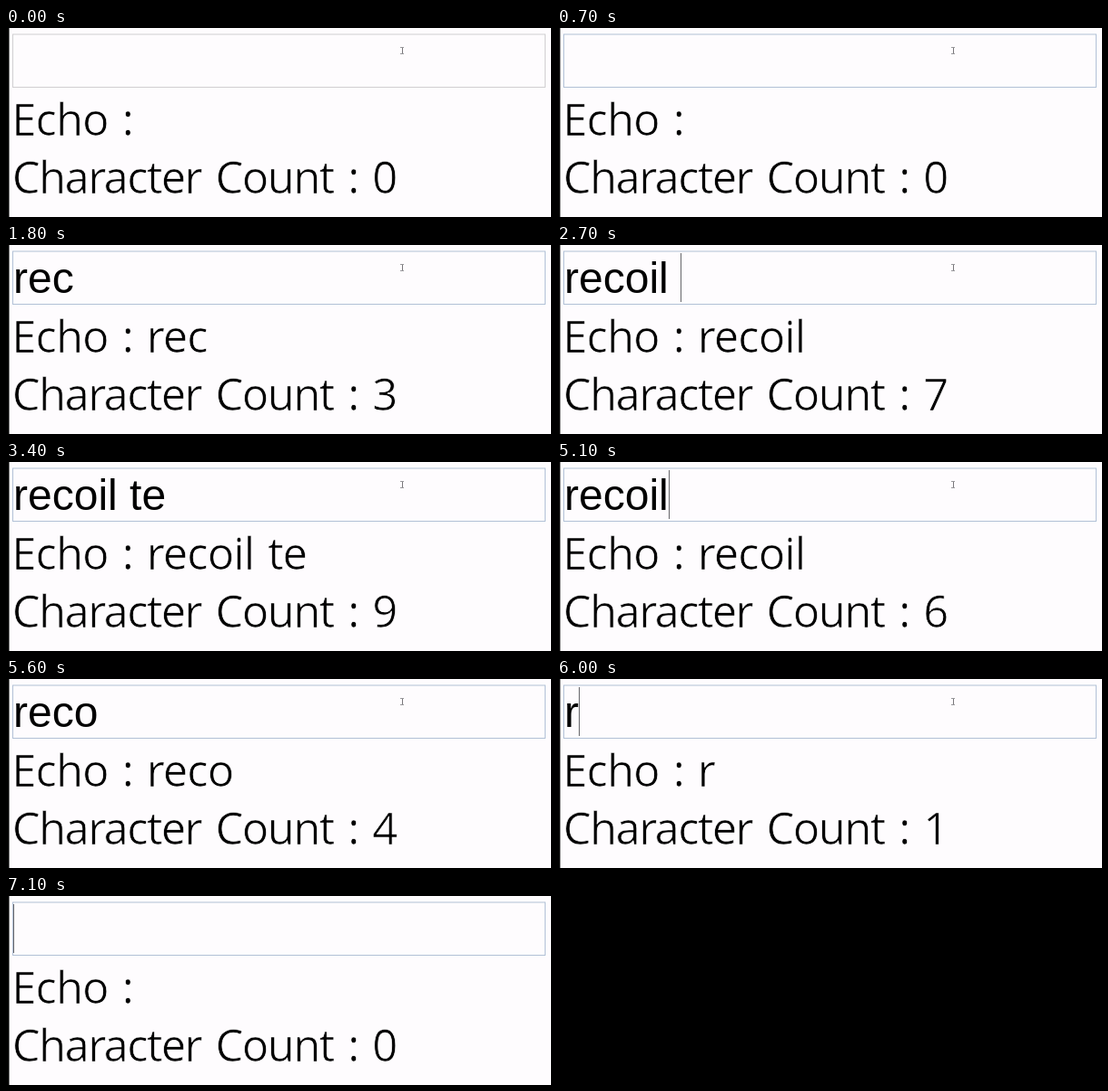
These frames come from a looping animation (600x209 px, 7.2 s). An HTML page with a canvas:

```html
<!DOCTYPE html>
<html lang="en">
<head>
<meta charset="utf-8">
<title>Character counter</title>
<style>
  html, body { margin: 0; width: 100%; height: 100%; overflow: hidden; background: #fefcfe; }
  canvas { display: block; }
</style>
</head>
<body>
<canvas id="stage" width="600" height="209"></canvas>
<script>
const LOOP = 7200;
const PAPER = "#fefcfe";
const PHRASE = "recoil tes";
const LABEL_FONT = '49px "Open Sans", "Noto Sans", sans-serif';
const INPUT_FONT = '48px "Liberation Sans", Arial, sans-serif';

const FOCUS = 100, POINTER_GONE = 6500;
const TYPING = { start: 1190, pace: 250 };
const DELETING = { start: 4495, pace: 185 };
const BLINK = { period: 1150, on: 550 };

const ctx = document.getElementById("stage").getContext("2d");

// Number of evenly paced key presses made by time t
function presses({ start, pace }, t) {
  const count = Math.floor((t - start) / pace) + 1;
  return Math.max(0, Math.min(PHRASE.length, count));
}

function rect(color, x, y, w, h) {
  ctx.fillStyle = color;
  ctx.fillRect(x, y, w, h);
}

function label(str, x, y, letterGap, wordGap) {
  ctx.font = LABEL_FONT;
  ctx.letterSpacing = letterGap + "px";
  ctx.wordSpacing = wordGap + "px";
  ctx.fillStyle = "#000";
  ctx.fillText(str, x, y);
  // A thin outline in the paper colour lightens the strokes
  ctx.lineWidth = 0.7;
  ctx.strokeStyle = PAPER;
  ctx.strokeText(str, x, y);
}

function drawInput(value, t) {
  const focused = t >= FOCUS;
  ctx.lineWidth = 1;
  ctx.strokeStyle = focused ? "#b1c1d6" : "#d0cfd1";
  ctx.strokeRect(7.5, 7, 586, 58.5);

  ctx.font = INPUT_FONT;
  ctx.letterSpacing = ctx.wordSpacing = "0px";
  ctx.fillStyle = "#000";
  ctx.fillText(value, 8, 53);
  if (focused && t % BLINK.period < BLINK.on) {
    const x = Math.round(8.3 + ctx.measureText(value).width);
    rect("#66666a", x, 9, 1, 54);
  }
}

function drawPointer() {
  rect("#77767a", 436, 21, 1, 8);
  for (const y of [21, 28]) rect("#99989c", 434, y, 4, 1);
}

function draw(t) {
  const value = PHRASE.slice(0, presses(TYPING, t) - presses(DELETING, t));

  rect(PAPER, 0, 0, 600, 209);
  rect("#000", 0, 0, 3.5, 209);
  drawInput(value, t);
  if (t < POINTER_GONE) drawPointer();
  label("Echo : " + value, 6.3, 118.5, -1, 3.4);
  label("Character Count : " + value.length, 6.7, 182.5, -1.6, 4.5);
}

function tick() {
  draw(performance.now() % LOOP);
  requestAnimationFrame(tick);
}
tick();
</script>
</body>
</html>
```
